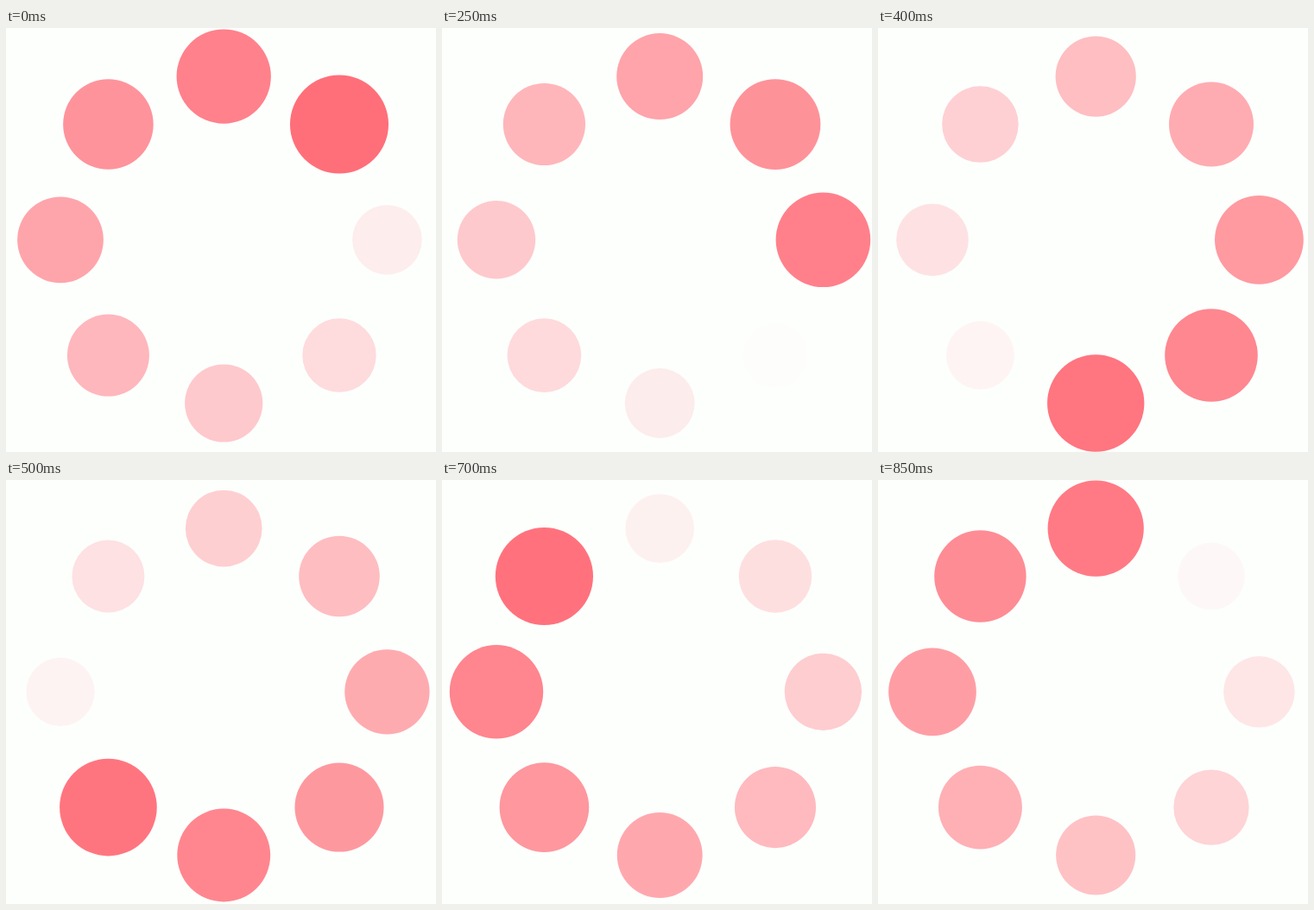
An HTML page with a canvas that plays this animation: 498x491 px, repeating every 0.9 s.

```html
<!DOCTYPE html>
<html lang="en">
<head>
<meta charset="utf-8">
<title>Loading</title>
<style>
  html, body { margin: 0; height: 100%; overflow: hidden; background: #fdfffd; }
  canvas { display: block; }
</style>
</head>
<body>
<canvas id="stage" width="498" height="491"></canvas>
<script>
const ctx = document.getElementById('stage').getContext('2d');
const LOOP = 900, STEP = 50, DOTS = 8;
const CENTER = { x: 252.2, y: 245.3 }, RING = 189.2;
const BIG = 57.1, SMALL = 38;

// Time (ms) to turn: a slow start, then a constant speed.
const PACE = [[0, 0.003], [150, 0.104], [250, 0.247], [LOOP, 1.012]];

function turnAt(t) {
  const k = PACE.findIndex(([end]) => t < end);
  const [t0, p0] = PACE[k - 1], [t1, p1] = PACE[k];
  return p0 + (p1 - p0) * (t - t0) / (t1 - t0);
}

function draw(now) {
  const t = Math.floor((now % LOOP) / STEP) * STEP;
  const turn = turnAt(t);
  ctx.globalAlpha = 1;
  ctx.fillStyle = '#fdfffd';
  ctx.fillRect(0, 0, 498, 491);
  ctx.fillStyle = '#ff6f7a';
  for (let i = 0; i < DOTS; i++) {
    const angle = i / DOTS * 2 * Math.PI;
    const age = (turn + 1 - (i + 1) / DOTS) % 1;
    ctx.globalAlpha = 1 - age;
    ctx.beginPath();
    ctx.arc(CENTER.x + RING * Math.cos(angle), CENTER.y + RING * Math.sin(angle),
      BIG + (SMALL - BIG) * age, 0, 2 * Math.PI);
    ctx.fill();
  }
}

const start = performance.now();
function loop() {
  draw(performance.now() - start);
  requestAnimationFrame(loop);
}
loop();
</script>
</body>
</html>
```
